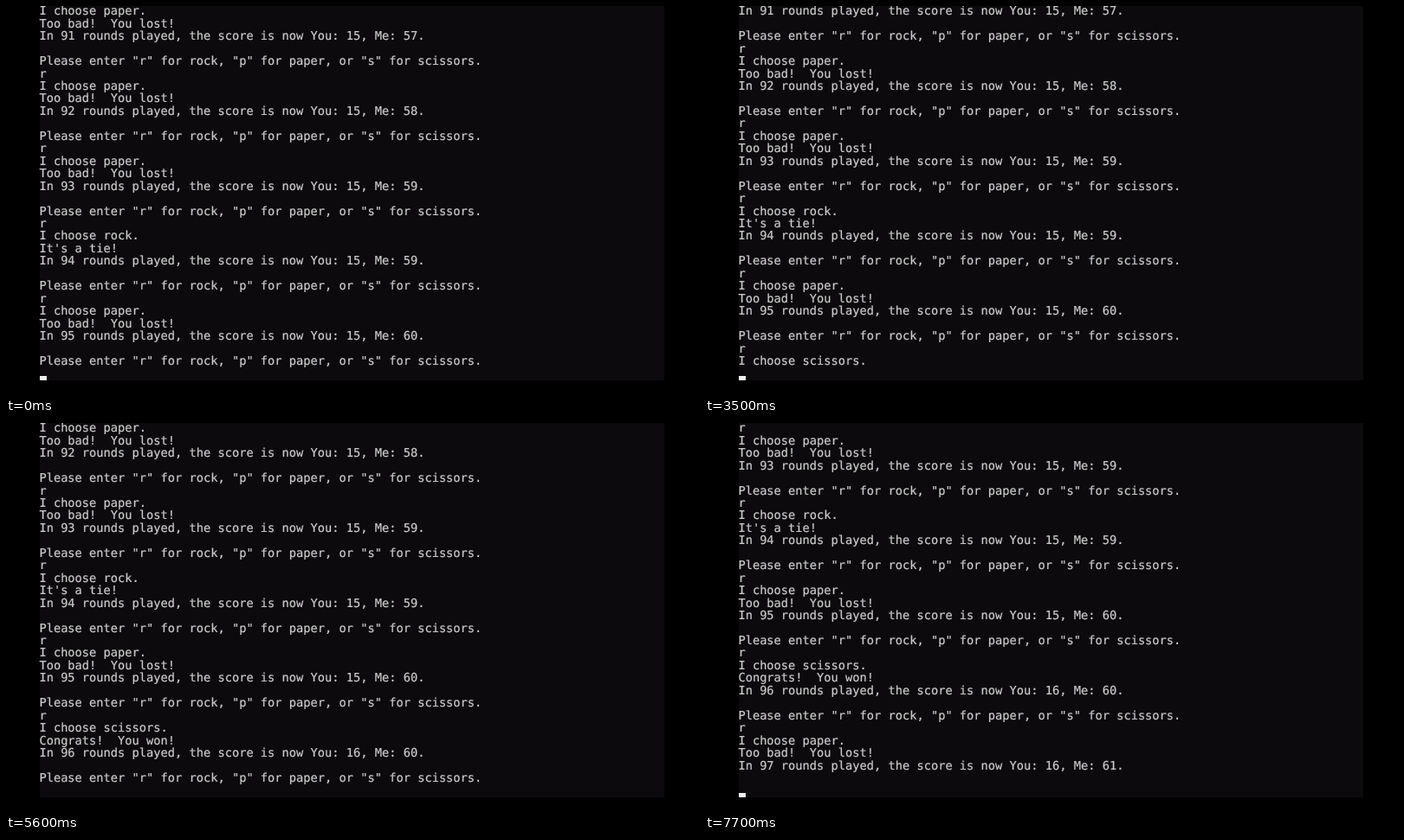
Recreate the animation shown at these times as an HTML page. Size 800 by 450 pixels, loop 8000 ms.

```html
<!DOCTYPE html>
<html lang="en">
<head>
<meta charset="utf-8">
<title>Rock, paper, scissors</title>
<style>
  html, body { margin: 0; width: 100%; height: 100%; overflow: hidden; background: #000; }
  #console { position: absolute; left: 39px; top: 0; width: 721px; height: 433px; background: #0c0a0c; }
  #screen {
    position: absolute; left: -0.6px; top: -0.7px; margin: 0; color: #ccc;
    font: 13.7px/14.45px "DejaVu Sans Mono", monospace;
    -webkit-text-stroke: 0.2px #ccc;
    text-rendering: geometricPrecision;
  }
  #cursor { position: absolute; left: 0; top: 428px; width: 8px; height: 5px; background: #f2f2f2; }
</style>
</head>
<body>
<div id="console"><pre id="screen"></pre><div id="cursor"></div></div>
<script>
const LOOP = 8000, ROWS = 30, CELL = 8.25, LINES_PER_ROUND = 6;
const ENTER_DELAY = 410, PRINT_DELAY = 362, BUSY = 2670, BLINK = 530;
const keyTimes = [-2270, 2500, 6080];

const screenEl = document.getElementById("screen");
const cursorEl = document.getElementById("cursor");

const LOST = "Too bad!  You lost!", TIE = "It's a tie!", WON = "Congrats!  You won!";
const results = { paper: LOST, rock: TIE, scissors: WON };
const choices = ["paper", "paper", "paper", "rock", "paper", "scissors", "paper"];

let you = 15, me = 56;
const lines = choices.flatMap((choice, i) => {
  const result = results[choice];
  if (result === WON) you++;
  if (result === LOST) me++;
  return [
    `I choose ${choice}.`,
    result,
    `In ${91 + i} rounds played, the score is now You: ${you}, Me: ${me}.`,
    "",
    'Please enter "r" for rock, "p" for paper, or "s" for scissors.',
    "r"
  ];
});

function stateAt(time) {
  const round = keyTimes.findLastIndex(key => key <= time);
  const sinceKey = time - keyTimes[round];
  // Enter, choice, result, score with its blank line, prompt
  const printed = Math.max(0, Math.min(5, 1 + Math.floor((sinceKey - ENTER_DELAY) / PRINT_DELAY)));
  const idle = sinceKey - BUSY;
  return {
    scroll: (round - 1) * LINES_PER_ROUND + printed + (printed > 3 ? 1 : 0),
    typed: printed === 0 ? 1 : 0,
    cursorOn: idle < 0 || Math.floor(idle / BLINK) % 2 === 1
  };
}

function draw(now) {
  const { scroll, typed, cursorOn } = stateAt(now % LOOP);
  const text = lines.slice(scroll, scroll + ROWS - 1 + typed).join("\n");
  if (screenEl.textContent !== text) screenEl.textContent = text;
  cursorEl.style.left = typed * CELL + "px";
  cursorEl.style.visibility = cursorOn ? "visible" : "hidden";
  requestAnimationFrame(draw);
}
draw(performance.now());
</script>
</body>
</html>
```
